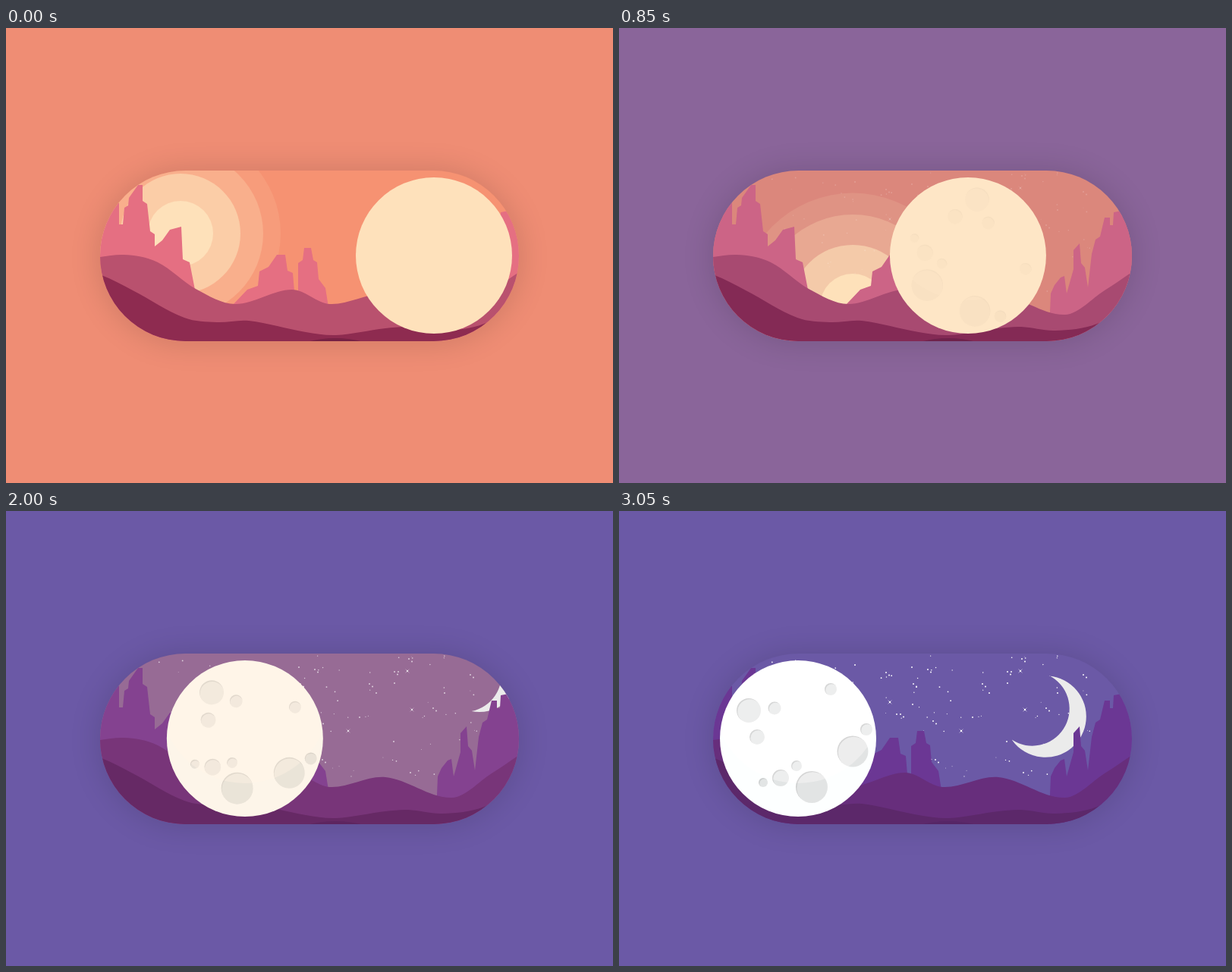
An HTML page with a canvas that plays this animation: 800x600 px, repeating every 3100 ms.

```html
<!DOCTYPE html>
<html lang="en">
<head>
<meta charset="utf-8">
<title>Day and night switch</title>
<style>
html, body { margin: 0; width: 100%; height: 100%; overflow: hidden; }
canvas { display: block; }
</style>
</head>
<body>
<canvas id="stage" width="800" height="600"></canvas>
<script>
const ctx = document.getElementById('stage').getContext('2d');
const LOOP = 3100, STEP = 50, TAU = Math.PI * 2;

// [day, night]
const COLORS = {
  page: ['#ef8d74', '#6b59a6'],
  sky: ['#f69272', '#6b59a6'],
  rock: ['#e56f82', '#6b3794'],
  back: ['#b9516e', '#672e7c'],
  front: ['#8e2b50', '#5c286a'],
  low: ['#762144', '#562666'],
  knob: ['#fee1bb', '#ffffff']
};

// Rock outlines as flat x, y lists, closed below the hills
const LEFT_ROCK = [110, 231, 149, 231, 149, 259, 154, 259, 156, 237, 161, 234, 162, 224,
  174, 207, 180, 207, 180, 228, 186, 232, 190, 268, 196, 272, 196, 288, 206, 280,
  216, 266, 231, 262, 233, 305, 242, 309, 249, 345];
const MIDDLE_ROCK = [300, 364, 318, 345, 332, 340, 334, 321, 346, 315, 357, 299, 368, 299,
  371, 320, 378, 323, 380, 347];
const TOWER_ROCK = [385, 310, 391, 306, 393, 290, 402, 290, 405, 306, 410, 309, 412, 331,
  421, 343, 425, 368];
const RIGHT_ROCK = [568, 374, 569, 350, 574, 339, 582, 329, 587, 327, 590, 350, 599, 318,
  599, 293, 607, 284, 609, 310, 614, 316, 618, 342, 623, 298, 628, 279, 634, 275,
  640, 250, 647, 250, 647, 260, 651, 260, 652, 243, 690, 236];

const BACK_HILL = [100, 306, 155, 299, 200, 309, 250, 344, 302, 364, 377, 345, 427, 364,
  500, 351, 588, 378, 640, 346, 676, 322];
const FRONT_HILL = [100, 322, 126, 326, 167, 346, 235, 382, 278, 388, 320, 386, 395, 401,
  435, 405, 500, 396, 530, 394, 575, 399, 630, 390, 700, 350];

// Leading stars, some of them with a close neighbour
const STARS = [311, 203, 352, 213, 366, 268, 371, 268, 386, 206, 388, 228, 392, 232, 407, 209,
  387, 255, 414, 277, 466, 272, 479, 228, 488, 240, 512, 212, 517, 212, 531, 195, 512, 227,
  563, 260, 578, 240, 612, 216, 511, 304, 417, 328, 533, 345];
const SPARKS = [[357, 252], [451, 290], [535, 262], [529, 211]];

// Crater x, y, radius from the knob centre, in the resting pose
const CRATERS = [[-65, -37, 16], [-31, -40, 8.5], [-54, -2, 10], [43, -65, 8], [90, -12, 8],
  [72, 17, 20.5], [-2, 36, 7], [-23, 52, 11], [-46, 58, 6], [18, 64, 21]];

// time, x, y of the sun
const SUN_PATH = [[0, 230, 271], [430, 230, 271], [850, 308, 367], [1200, 377, 470], [1500, 430, 570]];

let seed = 11;
const random = () => (seed = seed * 16807 % 2147483647) / 2147483647;
const DUST = Array.from({ length: 105 }, () =>
  [180 + random() * 455, 191 + random() * 160, 0.4 + random() * 0.55]);

const lerp = (a, b, k) => a + (b - a) * k;
const span = (t, from, to) => Math.min(1, Math.max(0, (t - from) / (to - from)));
const channel = (hex, i) => parseInt(hex.substr(1 + 2 * i, 2), 16);
const tint = (name, k) => {
  const [day, night] = COLORS[name];
  return `rgb(${[0, 1, 2].map(i => Math.round(lerp(channel(day, i), channel(night, i), k)))})`;
};

function disc(x, y, r, color) {
  ctx.beginPath();
  ctx.arc(x, y, r, 0, TAU);
  ctx.fillStyle = color;
  ctx.fill();
}

function pill() {
  ctx.beginPath();
  ctx.arc(236.5, 300.5, 112.5, TAU / 4, TAU * 3 / 4);
  ctx.arc(563.5, 300.5, 112.5, -TAU / 4, TAU / 4);
  ctx.closePath();
}

function rock(p) {
  ctx.beginPath();
  ctx.moveTo(p[0], 420);
  for (let i = 0; i < p.length; i += 2) ctx.lineTo(p[i], p[i + 1]);
  ctx.lineTo(p[p.length - 2], 420);
  ctx.fill();
}

// Smooth curve through the points, filled down to the bottom
function hill(p, color) {
  const last = p.length / 2 - 1;
  const x = i => p[2 * i], y = i => p[2 * i + 1];
  const slope = i => {
    const a = Math.max(0, i - 1), b = Math.min(last, i + 1);
    return (y(b) - y(a)) / (x(b) - x(a));
  };
  ctx.beginPath();
  ctx.moveTo(x(0), 430);
  ctx.lineTo(x(0), y(0));
  for (let i = 0; i < last; i++) {
    const j = i + 1, d = (x(j) - x(i)) / 3;
    ctx.bezierCurveTo(x(i) + d, y(i) + d * slope(i), x(j) - d, y(j) - d * slope(j), x(j), y(j));
  }
  ctx.lineTo(x(last), 430);
  ctx.fillStyle = color;
  ctx.fill();
}

function sun(t) {
  const next = SUN_PATH.findIndex(s => t < s[0]);
  if (next < 0) return;
  const a = SUN_PATH[next - 1], b = SUN_PATH[next];
  const k = span(t, a[0], b[0]);
  const x = lerp(a[1], b[1], k), y = lerp(a[2], b[2], k);
  const rings = [[132 + t * 0.0205, 0.12], [109 + t * 0.0142, 0.27], [79 + t * 0.0025, 0.6], [43, 1]];
  for (const [r, alpha] of rings) disc(x, y, r, `rgba(254,225,186,${alpha})`);
}

function stars(alpha) {
  ctx.globalAlpha = alpha;
  for (let i = 0; i < STARS.length; i += 2) {
    disc(STARS[i], STARS[i + 1], 0.95, '#fff');
    if (i % 4) disc(STARS[i] + 4, STARS[i + 1] + 3.5, 0.95, '#fff');
  }
  for (const [x, y, r] of DUST) disc(x, y, r, '#fff');
  ctx.strokeStyle = 'rgba(255,255,255,.6)';
  ctx.lineWidth = 0.7;
  for (const [x, y] of SPARKS) {
    disc(x, y, 1.2, '#fff');
    ctx.beginPath();
    for (const d of [-2.5, 2.5]) {
      ctx.moveTo(x - 2.5, y - d);
      ctx.lineTo(x + 2.5, y + d);
    }
    ctx.stroke();
  }
  ctx.globalAlpha = 1;
}

function crescent(t) {
  const swing = 86 * Math.pow(1 - span(t, 1494, 3050), 1.7);
  ctx.save();
  ctx.translate(519, 165);
  ctx.rotate(-swing * TAU / 360);
  ctx.translate(43, 106);
  // Both circles meet in the two tips
  const cutX = -17.3, cutY = -10.3;
  const angle = (x, y, cx, cy) => Math.atan2(y - cy, x - cx);
  ctx.beginPath();
  ctx.arc(0, 0, 53.8, angle(5, -54, 0, 0), angle(-44, 31, 0, 0));
  ctx.arc(cutX, cutY, 49, angle(-44, 31, cutX, cutY), angle(5, -54, cutX, cutY), true);
  ctx.closePath();
  ctx.fillStyle = '#ebebeb';
  ctx.fill();
  ctx.restore();
}

// Fills everything outside a circle, within the current clip
function outside(x, y, r, color) {
  ctx.beginPath();
  ctx.rect(-300, -300, 600, 600);
  ctx.moveTo(x + r, y);
  ctx.arc(x, y, r, 0, TAU);
  ctx.fillStyle = color;
  ctx.fill('evenodd');
}

function knob(t) {
  const move = span(t, 25, 2625);
  const turn = (1 - move) * 102 * TAU / 360;
  ctx.save();
  ctx.translate(lerp(564, 236, move), 300);
  disc(0, 0, 103, tint('knob', span(t, 480, 2780)));
  ctx.globalAlpha = span(t, 400, 2750);

  ctx.save();
  ctx.beginPath();
  ctx.arc(0, 0, 103, 0, TAU);
  ctx.clip();
  outside(0, -52, 111, 'rgba(190,255,250,.04)');
  ctx.restore();

  for (const [x, y, r] of CRATERS) {
    ctx.save();
    ctx.rotate(turn);
    disc(x, y, r, 'rgba(0,10,10,.07)');
    ctx.clip();
    outside(x + 1.3, y + 1.2, r, 'rgba(0,0,0,.1)');
    ctx.rotate(-turn);
    outside(0, -52, 111, 'rgba(0,0,0,.04)');
    ctx.restore();
  }
  ctx.restore();
}

function draw(t) {
  const dusk = span(t, 400, 2750), land = span(t, 450, 2400);
  ctx.fillStyle = tint('page', span(t, 25, 1100));
  ctx.fillRect(0, 0, 800, 600);

  ctx.save();
  ctx.shadowColor = 'rgba(0,0,0,.15)';
  ctx.shadowBlur = 42;
  ctx.shadowOffsetY = 1;
  pill();
  ctx.fillStyle = tint('sky', dusk);
  ctx.fill();
  ctx.restore();

  ctx.save();
  pill();
  ctx.clip();
  sun(t);
  stars(dusk);
  crescent(t);
  ctx.fillStyle = tint('rock', land);
  [LEFT_ROCK, MIDDLE_ROCK, TOWER_ROCK, RIGHT_ROCK].forEach(rock);
  hill(BACK_HILL, tint('back', land));
  hill(FRONT_HILL, tint('front', land));
  ctx.beginPath();
  ctx.ellipse(434, 425, 50, 16, 0, 0, TAU);
  ctx.fillStyle = tint('low', land);
  ctx.fill();
  ctx.restore();

  knob(t);
}

const start = performance.now();
function tick() {
  const t = (performance.now() - start) % LOOP;
  draw(Math.floor(t / STEP) * STEP);
  requestAnimationFrame(tick);
}
tick();
</script>
</body>
</html>
```
